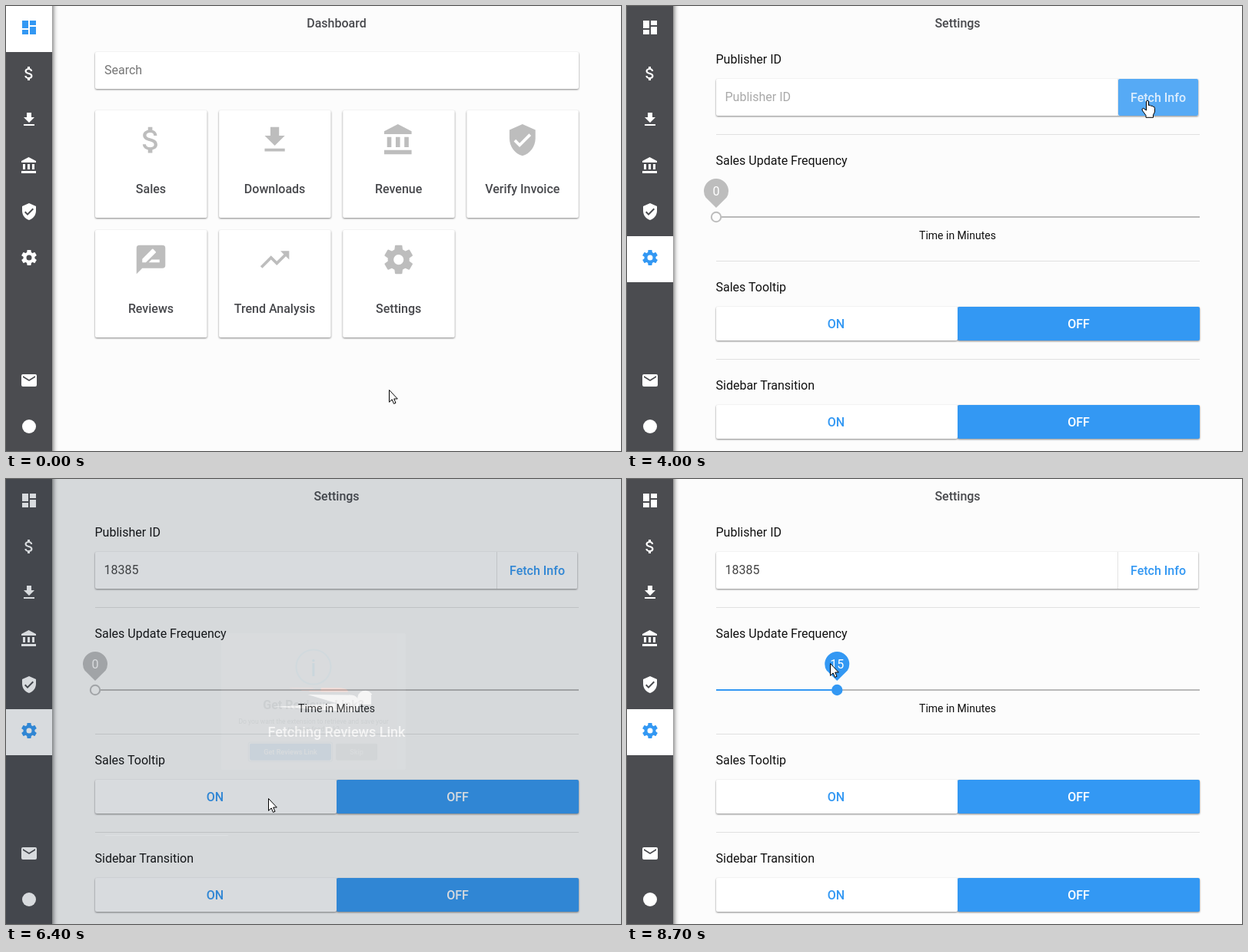
An HTML page for the animation above (9110 ms loop, 800 by 580 pixels).

```html
<!DOCTYPE html>
<html lang="en">
<head>
<meta charset="utf-8">
<title>Settings walkthrough</title>
<style>
  html, body { margin: 0; width: 100%; height: 100%; overflow: hidden; background: #fcfcfc; }
  svg { display: block; width: 800px; height: 580px; font-family: Roboto, sans-serif; }
  .raised { filter: drop-shadow(0 1px 1.3px rgba(0, 0, 0, .48)); }
  .hot { filter: drop-shadow(0 1px 2px rgba(0, 0, 0, .55)); }
  .side { filter: drop-shadow(1px 0 3px rgba(0, 0, 0, .65)); }
</style>
</head>
<body>
<svg id="stage" viewBox="0 0 800 580"></svg>
<script>
const LOOP = 9110;
const BLUE = '#3398f3', GREY = '#bdbdbd', INK = '#48494d';
const $ = id => document.getElementById(id);

// ---------- building blocks ----------
const text = (x, y, s, { size = 16, weight = 400, fill = '#111', anchor = 'start', id = '' } = {}) =>
  `<text id="${id}" x="${x}" y="${y}" font-size="${size}" font-weight="${weight}" fill="${fill}" text-anchor="${anchor}">${s}</text>`;
const mid = (x, y, s, o) => text(x, y, s, { anchor: 'middle', ...o });
const rect = (x, y, w, h, fill, extra = '') =>
  `<rect x="${x}" y="${y}" width="${w}" height="${h}" fill="${fill}" ${extra}/>`;
const path = d => `<path d="${d}"/>`;

const tooth = a => `<path transform="rotate(${a} 12 12)" d="M9.1 5.6L9.5 2.4Q9.6 2 10 2H14Q14.4 2 14.5 2.4L14.9 5.6z"/>`;
const ICONS = {
  board: path('M3 13h8V3H3zm0 8h8v-6H3zm10 0h8V11h-8zm0-18v6h8V3z'),
  money: path('M11.8 10.9c-2.27-.59-3-1.2-3-2.15 0-1.09 1.01-1.85 2.7-1.85 1.78 0 2.44.85 2.5 2.1h2.21c-.07-1.72-1.12-3.3-3.21-3.81V3h-3v2.16c-1.94.42-3.5 1.68-3.5 3.61 0 2.31 1.91 3.46 4.7 4.13 2.5.6 3 1.48 3 2.41 0 .69-.49 1.79-2.7 1.79-2.06 0-2.87-.92-2.98-2.1h-2.2c.12 2.19 1.76 3.42 3.68 3.83V21h3v-2.15c1.95-.37 3.5-1.5 3.5-3.55 0-2.84-2.43-3.81-4.7-4.4z'),
  down: path('M19 9h-4V3H9v6H5l7 7zM5 18v2h14v-2z'),
  bank: path('M4 10v7h3v-7zm6 0v7h3v-7zM2 22h19v-3H2zm14-12v7h3v-7zm-4.5-9L2 6v2h19V6z'),
  shield: path('M12 1L3 5v6c0 5.55 3.84 10.74 9 12 5.16-1.26 9-6.45 9-12V5zm-2 16l-4-4 1.41-1.41L10 14.17l6.59-6.59L18 9z'),
  review: path('M20 2H4Q2 2 2 4V22l4-4h14q2 0 2-2V4q0-2-2-2zM6 14v-2.47l6.88-6.88q.35-.3.71 0l1.77 1.77q.3.35 0 .71L8.47 14zm12 0h-7.5l2-2H18z'),
  trend: path('M16 6l2.29 2.29-4.88 4.88-4-4L2 16.59 3.41 18l6-6 4 4 6.3-6.29L22 12V6z'),
  gear: '<circle cx="12" cy="12" r="5.5" fill="none" stroke="currentColor" stroke-width="4"/>' +
    [0, 60, 120, 180, 240, 300].map(tooth).join(''),
  mail: path('M20 4H4Q2 4 2 6V18q0 2 2 2h16q2 0 2-2V6q0-2-2-2zm0 4l-8 5-8-5V6l8 5 8-5z'),
  dot: '<circle cx="12" cy="12" r="9"/>'
};
const icon = (name, cx, cy, size, color, id = '') =>
  `<g id="${id}" color="${color}" fill="currentColor" transform="translate(${cx - size / 2} ${cy - size / 2}) scale(${size / 24})">${ICONS[name]}</g>`;

// ---------- scenery ----------
const MENU = [['board', 28], ['money', 88], ['down', 148], ['bank', 208], ['shield', 268],
  ['gear', 328], ['mail', 488], ['dot', 548]];
const sidebar = active => rect(0, -10, 60, 600, '#4b4c50', 'class="side"') +
  MENU.map(([name, y], i) => (i === active ? rect(0, y - 28, 60, 60, '#fff') : '') +
    icon(name, 30, y, 24, i === active ? BLUE : '#fff')).join('');
const heading = s => mid(430, 28, s, { weight: 500, fill: INK });

const CARDS = [['money', 'Sales'], ['down', 'Downloads'], ['bank', 'Revenue'], ['shield', 'Verify Invoice'],
  ['review', 'Reviews'], ['trend', 'Trend Analysis'], ['gear', 'Settings']]
  .map(([name, label], i) => ({ name, label, x: 116 + i % 4 * 161.1, y: i < 4 ? 136 : 292, w: 145.5, h: 140 }));
const dashboard = heading('Dashboard') +
  rect(116, 60, 629, 48, '#fff', 'class="raised" rx="2"') +
  text(128, 89, 'Search', { fill: '#757575' }) +
  CARDS.map((c, i) => rect(c.x, c.y, c.w, c.h, '#fff', `id="card${i}" class="raised" rx="2"`) +
    icon(c.name, c.x + 72.5, c.y + 38.6, 45, GREY, 'cardIcon' + i) +
    mid(c.x + 72.5, c.y + 108, c.label, { weight: 500, fill: INK })).join('');

const toggle = (y, label) => text(115.5, y - 20, label) +
  `<g class="raised">${rect(116, y, 314, 44, '#fff', 'rx="2"')}${rect(430, y, 315, 44, BLUE, 'rx="2"')}</g>` +
  mid(272, y + 28, 'ON', { weight: 500, fill: BLUE }) + mid(587.5, y + 28, 'OFF', { weight: 500, fill: '#fff' });
const settings = heading('Settings') + text(115.5, 75, 'Publisher ID') +
  `<g class="raised">${rect(116, 95, 627, 48, '#fff', 'rx="2"')}${rect(639, 95, 104, 48, '#fff', 'id="fetch" rx="2"')}</g>` +
  rect(638, 95, 1, 48, '#e4e4e4') +
  text(127.5, 124, '', { id: 'field' }) +
  mid(691, 125, 'Fetch Info', { weight: 500, id: 'fetchText' }) +
  [167, 332, 460].map(y => rect(116, y, 629, 1, '#e0e0e0')).join('') +
  text(115.5, 207, 'Sales Update Frequency') +
  rect(116, 274, 629, 2, '#b9b9b9') + rect(116, 274, 0, 2, BLUE, 'id="track"') +
  `<g id="thumb"><path id="bubble" d="M-13.6 249.5A16 16 0 1 1 13.6 249.5L0 263z"/>
   <circle id="knob" cy="275" r="6.2" stroke-width="2"/>${mid(0, 247, '0', { fill: '#fff', id: 'minutes' })}</g>` +
  mid(430, 304, 'Time in Minutes', { size: 14 }) +
  toggle(392, 'Sales Tooltip') + toggle(520, 'Sidebar Transition');

// ---------- loader ----------
const STREAKS = [ // row, travel, duration, offset
  [0, 80, 200, 0], [3, 100, 400, 0], [1, 50, 400, 1000], [4, 150, 1000, 1000]];
const LINES = [ // y, end of travel, duration, phase of first run, phase of second run
  [116, -1600, 600, .455, .344], [232, -1600, 800, .367, .434],
  [348, -800, 600, .518, .8], [464, -800, 500, .596, .471]];
const SHAKE = [[2, 1, 0], [-1, -3, -1], [-2, 0, 1], [1, 2, 0], [1, -1, 1], [-1, 3, -1],
  [-1, 1, 0], [3, 1, -1], [-2, -1, 1], [2, 1, 0], [1, -2, -1]];
const loader = `<g id="loader">${rect(0, 0, 800, 580, '#2c3e50', 'opacity=".87"')}
  ${LINES.map((l, i) => rect(0, l[0], 160, 1, '#fff', `id="line${i}"`)).join('')}
  <g id="flyer" fill="#fff">
    <path d="M60-19H85Q95-18 95-15V-14H60z" fill="#f0623f"/>
    ${STREAKS.map((s, i) => rect(60, s[0] - 19, 30, 1, '#f0623f', `id="streak${i}"`)).join('')}
    <path d="M0 6L100 0V12zM43-10H98V6z"/><circle cx="99" cy="1" r="11"/>
    <g transform="translate(115 -9) rotate(-40)"><path d="M-10 6V4A10 10 0 0 1 10 4V6z"/>
      <rect x="-6" y="-6" width="12" height="12" rx="1" transform="translate(0 7) rotate(40)"/></g>
  </g>${mid(430, 336, '', { size: 18, weight: 500, fill: '#fff', id: 'loaderText' })}</g>`;

// ---------- dialogs ----------
const dialog = (id, y, h, body) => `<g id="${id}">${rect(0, 0, 800, 580, '#000', `id="${id}Shade"`)}
  <g id="${id}Box">${rect(176, y, 448, h, '#fff', 'rx="5"')}${body}</g></g>`;
const button = (x, y, w, h, label, fill, id) =>
  rect(x - 3, y - 3, w + 6, h + 6, 'none', `id="${id}Ring" rx="6" stroke="#adc1d5" stroke-width="2"`) +
  rect(x, y, w, h, fill, `id="${id}" rx="4"`) +
  mid(x + w / 2, y + h / 2 + 6, label, { size: 17, weight: 500, fill: '#fff' });
const title = (y, s) => mid(400, y, s, { size: 30, weight: 600, fill: '#595959' });
const note = (y, s) => mid(400, y, s, { fill: '#5c5c5c' });
const errorBox = dialog('error', 134, 312,
  `<g id="cross" fill="#f27474"><circle r="42" fill="none" stroke="#f27474" stroke-width="4"/>
   <g id="mark">${[45, -45].map(a => rect(-23.5, -2.5, 47, 5, '#f27474', `rx="2" transform="rotate(${a})"`)).join('')}</g></g>` +
  title(318, 'Error') + note(353, "We couldn't find your Publisher ID.") +
  button(355, 382, 90, 42, 'OK', '#3085d6', 'ok'));
const askBox = dialog('ask', 124, 332,
  '<circle cx="400" cy="206" r="42" fill="none" stroke="#9de0f6" stroke-width="4"/>' +
  mid(400, 228, 'i', { size: 60, fill: '#3fb9ea' }) + title(309, 'Get Reviews Link?') +
  note(344, 'Do you want the extension to retrieve and save your') + note(363, 'reviews feed link?') +
  button(245, 392, 198, 41, 'Get Reviews Link', '#3085d6', 'get') +
  button(454, 392, 101, 41, 'Skip', '#aaa', 'skip'));

const cursor = `<g id="cursor" fill="#fff" stroke="#000" stroke-width="1" stroke-linejoin="round">
  <path id="arrow" d="M.5.5V16.3L4.2 12.9 6.5 18.4 9 17.3 6.7 12H11.3z"/>
  <path id="hand" d="M-1.5 1Q0-.7 1.5 1V6.5Q3.5 5.5 4.5 7.3Q6.3 6.4 7.2 8.2Q9.5 7.7 9.5 10.2V15L7.5 19V22.3H-2V19.5L-6.8 13Q-7.6 10.4-5.2 10.2L-1.5 13z"/></g>`;

$('stage').innerHTML = rect(0, 0, 800, 580, '#fcfcfc') +
  `<g id="home">${dashboard}${sidebar(0)}</g><g id="prefs">${settings}${sidebar(5)}</g>` +
  loader + errorBox + askBox + cursor;

// ---------- motion ----------
const clamp = v => Math.min(1, Math.max(0, v));
const lerp = (a, b, k) => a + (b - a) * k;
const swing = k => .5 - .5 * Math.cos(Math.PI * k);
function ease(k) { // cubic-bezier(.25, .1, .25, 1)
  let lo = 0, hi = 1;
  const curve = (a, b, u) => 3 * a * u * (1 - u) ** 2 + 3 * b * u * u * (1 - u) + u ** 3;
  for (let i = 0; i < 16; i++) {
    const u = (lo + hi) / 2;
    curve(.25, .25, u) < k ? lo = u : hi = u;
  }
  return curve(.1, 1, lo);
}
function at(t, keys, fn, col = 1) {
  const n = keys.findIndex(k => k[0] > t);
  if (n < 0) return keys[keys.length - 1][col];
  if (n === 0) return keys[0][col];
  const a = keys[n - 1], b = keys[n];
  return lerp(a[col], b[col], fn((t - a[0]) / (b[0] - a[0])));
}
const set = (id, attrs) => { for (const k in attrs) $(id).setAttribute(k, attrs[k]); };
const show = (id, on) => { $(id).style.display = on ? '' : 'none'; };
const inside = (x, y, b) => x >= b.x && x <= b.x + b.w && y >= b.y && y <= b.y + b.h;
const mix = (a, b, k) => `rgb(${a.map((v, i) => Math.round(lerp(v, b[i], k)))})`;

const POINTER = [[0, 498, 500], [400, 498, 500], [1070, 225, 232], [2500, 225, 232], [2600, 215, 223],
  [3030, 405, 401], [3260, 405, 401], [3930, 677, 123], [5400, 677, 123], [5900, 341, 416],
  [7050, 341, 416], [7430, 109, 239], [7600, 109, 239], [8480, 262, 240], [8700, 264, 240]];
const FADE = [[4200, 0], [4600, 1], [5030, 1], [5430, 0], [6300, 0], [6670, 1], [7070, 0]];
const POP = [[0, .7], [135, 1.05], [240, .95], [300, 1]];
const OK = { x: 355, y: 382, w: 90, h: 42 }, GET = { x: 245, y: 392, w: 198, h: 41 };

function drawDialog(id, t, from, to) {
  show(id, t >= from && t < to + 150);
  const out = ease(clamp((t - to) / 150));
  const scale = t < to ? at(t - from, POP, ease) : lerp(1, .5, out);
  set(id + 'Shade', { opacity: .4 * clamp((t - from) / 100) * (1 - out) });
  set(id + 'Box', { opacity: 1 - out, transform: `translate(400 290) scale(${scale}) translate(-400 -290)` });
}

function drawLoader(t) {
  const fade = at(t, FADE, swing), second = t > 6000;
  show('loader', fade > 0);
  set('loader', { opacity: fade });
  $('loaderText').textContent = second ? 'Fetching Reviews Link' : 'Fetching your publisher information';
  const run = Math.max(0, t - (second ? 6300 : 4220));
  STREAKS.forEach(([, travel, dur, off], i) => {
    const p = (run + off) % dur / dur;
    set('streak' + i, { x: 60 - travel * p, opacity: 1 - p });
  });
  LINES.forEach(([, end, dur, p1, p2], i) => {
    const p = ((second ? p2 + (t - 6830) / dur : p1 + (t - 4630) / dur) % 1 + 1) % 1;
    set('line' + i, { x: lerp(1600, end, p), opacity: .65 * (1 - p) });
  });
  const s = run % 400 / 40, n = Math.floor(s);
  const [x, y, a] = SHAKE[n].map((v, i) => lerp(v, SHAKE[n + 1][i], s - n));
  set('flyer', { transform: `translate(${350 + x} ${290 + y}) rotate(${a} 50 0)` });
}

function draw(t) {
  const x = at(t, POINTER, swing, 1), y = at(t, POINTER, swing, 2);
  const home = t < 1630;
  show('home', home);
  show('prefs', !home);

  let hand = false;
  CARDS.forEach((c, i) => {
    const over = home && inside(x, y, c);
    hand = hand || over;
    set('cardIcon' + i, { color: over ? BLUE : GREY });
    set('card' + i, { class: over ? 'hot' : 'raised' });
  });

  const hover = clamp((t - 3880) / 230) * (1 - clamp((t - 5460) / 200));
  set('fetch', { fill: mix([255, 255, 255], [51, 152, 243], ease(hover)) });
  set('fetchText', { fill: mix([51, 152, 243], [255, 255, 255], ease(hover)) });
  const filled = t >= 5030;
  $('field').textContent = filled ? '18385' : 'Publisher ID';
  set('field', { fill: filled ? '#444' : '#a9a9a9' });

  const minutes = t < 7600 ? 0 : Math.min(15, Math.max(0, Math.round((x - 108) / 10.3)));
  const pos = minutes * 629 / 60, tint = minutes ? BLUE : GREY;
  set('track', { width: pos });
  set('thumb', { transform: `translate(${116 + pos} 0)` });
  set('bubble', { fill: tint });
  set('knob', { stroke: tint, fill: minutes ? BLUE : '#fcfcfc' });
  $('minutes').textContent = minutes;

  drawLoader(t);
  drawDialog('error', t, 1630, 3230);
  drawDialog('ask', t, 5030, 6300);

  const turn = ease(clamp((t - 1630) / 500)), m = t - 1630;
  set('cross', { opacity: turn, transform: `translate(400 215) scale(1 ${Math.cos((1 - turn) * 100 * Math.PI / 180)})` });
  const size = at(m, [[250, .4], [400, 1.15], [500, 1]], ease);
  const drop = at(m, [[250, 26], [400, -6], [500, 0]], ease);
  set('mark', { opacity: at(m, [[250, 0], [500, 1]], ease), transform: `translate(0 ${drop}) scale(${size})` });

  const overOk = t > 2500 && t < 3300 && inside(x, y, OK);
  const overGet = t > 5400 && t < 6300 && inside(x, y, GET);
  set('ok', { fill: overOk ? '#2b78c1' : '#3085d6' });
  set('get', { fill: overGet ? '#2b78c1' : '#3085d6' });
  show('getRing', t >= 6030);
  show('skipRing', false);

  hand = hand || overOk || overGet || t > 3850 && t < 5480 && inside(x, y, { x: 639, y: 95, w: 104, h: 48 });
  show('hand', hand);
  show('arrow', !hand);
  set('cursor', { transform: `translate(${Math.round(x)} ${Math.round(y)})` });
}

const start = performance.now();
(function frame() {
  draw((performance.now() - start) % LOOP);
  requestAnimationFrame(frame);
})();
</script>
</body>
</html>
```
